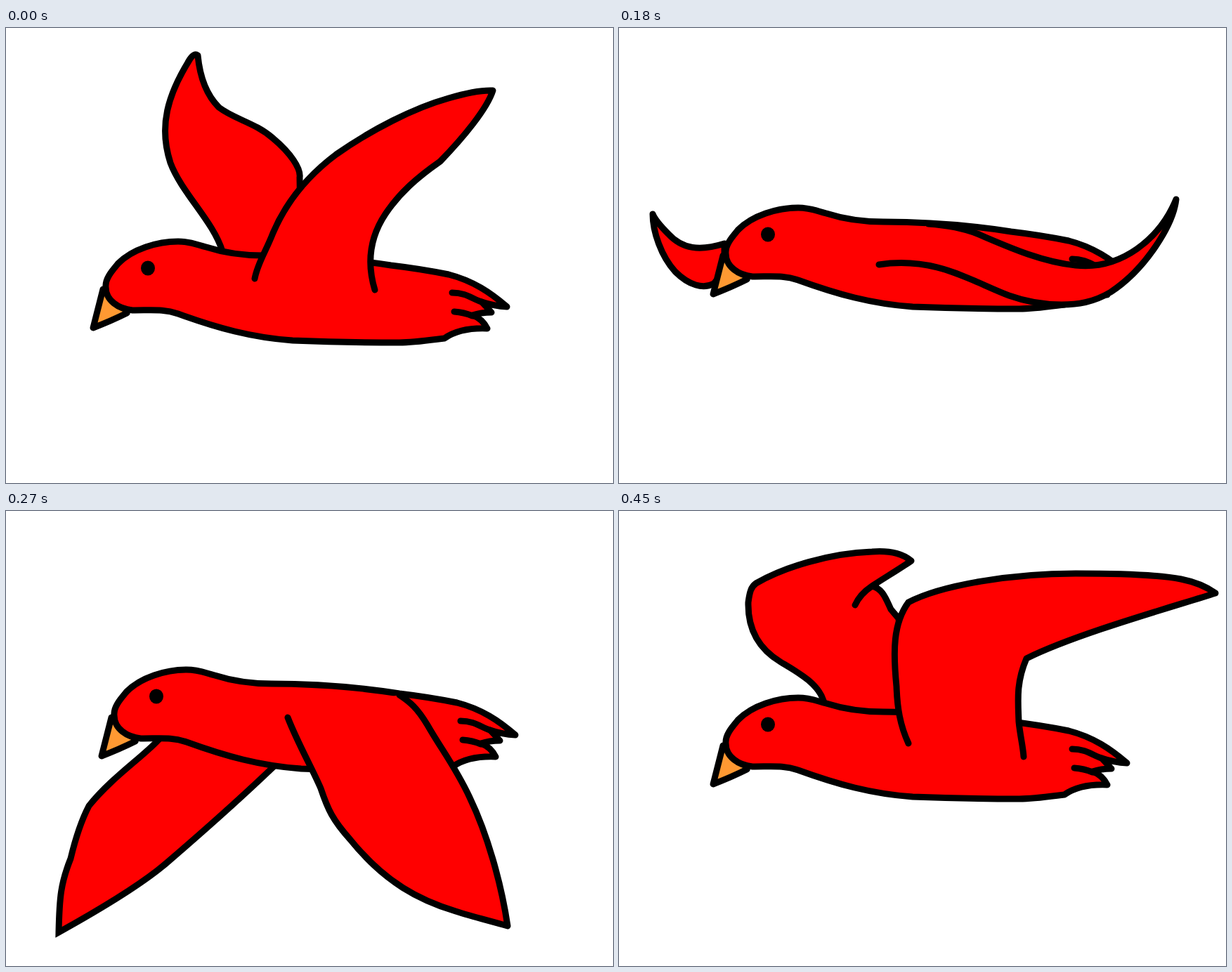
An HTML page without scripts that plays this animation: 864x648 px, repeating every 540 ms.

```html
<!DOCTYPE html>
<html lang="en">
<head>
<meta charset="utf-8">
<title>Flying bird</title>
<style>
  html, body { margin: 0; width: 100%; height: 100%; overflow: hidden; background: #fff; }
  svg { display: block; width: 100vw; height: 100vh; }
  path { fill: #f00; stroke: #000; stroke-width: 9; stroke-linecap: round; stroke-linejoin: round; }
  .beak { fill: #ff9932; }
  .line { fill: none; }
  .pose {
    visibility: hidden;
    animation: show 540ms step-end infinite;
    animation-delay: calc((var(--i) - 6) * 90ms);
  }
  @keyframes show {
    0% { visibility: visible; }
    16.666%, 100% { visibility: hidden; }
  }
</style>
</head>
<body>
<svg viewBox="0 0 864 648">
  <defs>
    <g id="body">
      <path class="beak" d="M138 372L124 427Q150 417 172 406L160 380Z"/>
      <path d="M142 369C141 357 150 347 160 335C180 315 215 304 245 304C262 304 270 308 285 312
        C310 320 335 324 366 324C430 324 490 329 548 338Q590 343 630 351C665 360 690 377 713 397
        Q694 396 677 390L691 405Q676 405 664 409Q678 414 685 428C660 427 640 431 624 442C600 445 580 448 560 448
        C510 448 460 447 408 445C350 441 300 427 245 407C225 400 210 402 180 402C160 400 142 388 142 369Z"/>
      <path class="line" d="M635 377C655 377 664 386 677 390M638 404Q652 405 664 410"/>
      <ellipse cx="202" cy="342" rx="10" ry="10.5"/>
    </g>
  </defs>

  <g class="pose" style="--i:0">
    <path d="M308 318C295 275 250 235 234 192C217 140 230 95 262 44Q268 35 273 39C276 70 285 95 303 113
      C325 130 355 135 380 157C405 178 420 200 418 213L420 330H312Z"/>
    <use href="#body"/>
    <path d="M354 357C358 335 370 318 380 292C400 245 430 210 470 180C520 145 580 114 630 100Q670 88 693 89
      C685 115 650 157 618 190C585 213 560 235 540 265C520 295 512 330 525 373"/>
  </g>

  <g class="pose" style="--i:1">
    <path d="M299 292C290 270 280 258 262 252C235 246 195 244 163 236C115 222 99 185 99 145
      C99 110 110 80 124 49C135 50 140 65 150 74C170 92 220 122 260 136C310 153 360 173 392 193
      C415 207 428 225 437 243V300L390 320L305 310Z"/>
    <use href="#body" x="5" y="-19"/>
    <path d="M361 340C371 336 375 318 383 306C400 278 425 252 450 235C510 196 580 182 640 151
      C668 137 695 119 713 104C730 89 738 72 739 48C748 70 747 100 740 130C732 162 718 187 700 206
      C686 222 674 227 655 236C630 247 600 258 567 269C558 290 554 322 556 351M566 268Q572 254 582 241"/>
  </g>

  <g class="pose" style="--i:2">
    <path d="M150 307C115 318 90 315 70 293C58 281 50 270 48 265C48 290 60 325 80 347
      C100 367 120 372 135 364L150 345Z"/>
    <use href="#body" x="10" y="-48"/>
    <path d="M440 279C470 281 490 285 510 293C550 310 600 333 650 338C715 345 770 300 793 244
      C789 280 750 343 700 376C675 391 652 394 630 394C602 394 580 390 555 381C500 360 450 325 370 337"/>
  </g>

  <g class="pose" style="--i:3">
    <path style="stroke-linejoin:miter" d="M217 326C195 350 150 380 118 420C105 445 98 470 92 495
      C78 530 76 550 75 600C120 575 190 535 230 500C280 457 335 408 380 365V350L230 310Z"/>
    <use href="#body" x="12" y="-78"/>
    <path d="M401 294C415 330 435 365 448 395C458 425 465 440 490 468C540 530 590 555 640 570
      C665 578 690 584 714 591C705 530 685 460 660 408C640 365 620 340 600 305C585 280 575 272 560 262"/>
  </g>

  <g class="pose" style="--i:4">
    <path d="M344 262C320 255 300 236 275 225C240 212 200 207 178 226C150 250 138 285 143 340
      M150 373C165 420 195 465 228 517C245 540 260 548 270 574C262 520 260 470 270 435
      C278 410 285 395 293 372V345H160Z"/>
    <use href="#body" x="12" y="-55"/>
    <path d="M389 268C370 245 357 220 358 204C360 188 375 187 390 191C420 203 450 225 476 244
      C510 273 543 300 573 331C600 360 615 376 632 393C662 425 688 460 705 495
      C650 470 580 432 525 393C480 362 435 330 410 297C400 285 400 274 389 268Z"/>
  </g>

  <g class="pose" style="--i:5">
    <path d="M291 270C283 245 255 230 230 215C200 197 183 170 184 130C186 115 188 108 195 103
      C235 80 300 60 360 58C390 56 405 62 416 71C400 82 375 97 360 107C375 110 380 125 387 140
      L398 153L410 300H300ZM360 107C348 115 340 125 336 134"/>
    <use href="#body" x="10" y="-38"/>
    <path d="M412 331C400 305 396 280 395 250C390 200 390 160 412 130C460 105 560 89 650 89
      C720 89 770 91 800 97C825 102 838 109 849 117C790 136 650 175 580 210
      C565 245 568 270 569 300C571 320 575 335 576 350"/>
  </g>
</svg>
</body>
</html>
```
